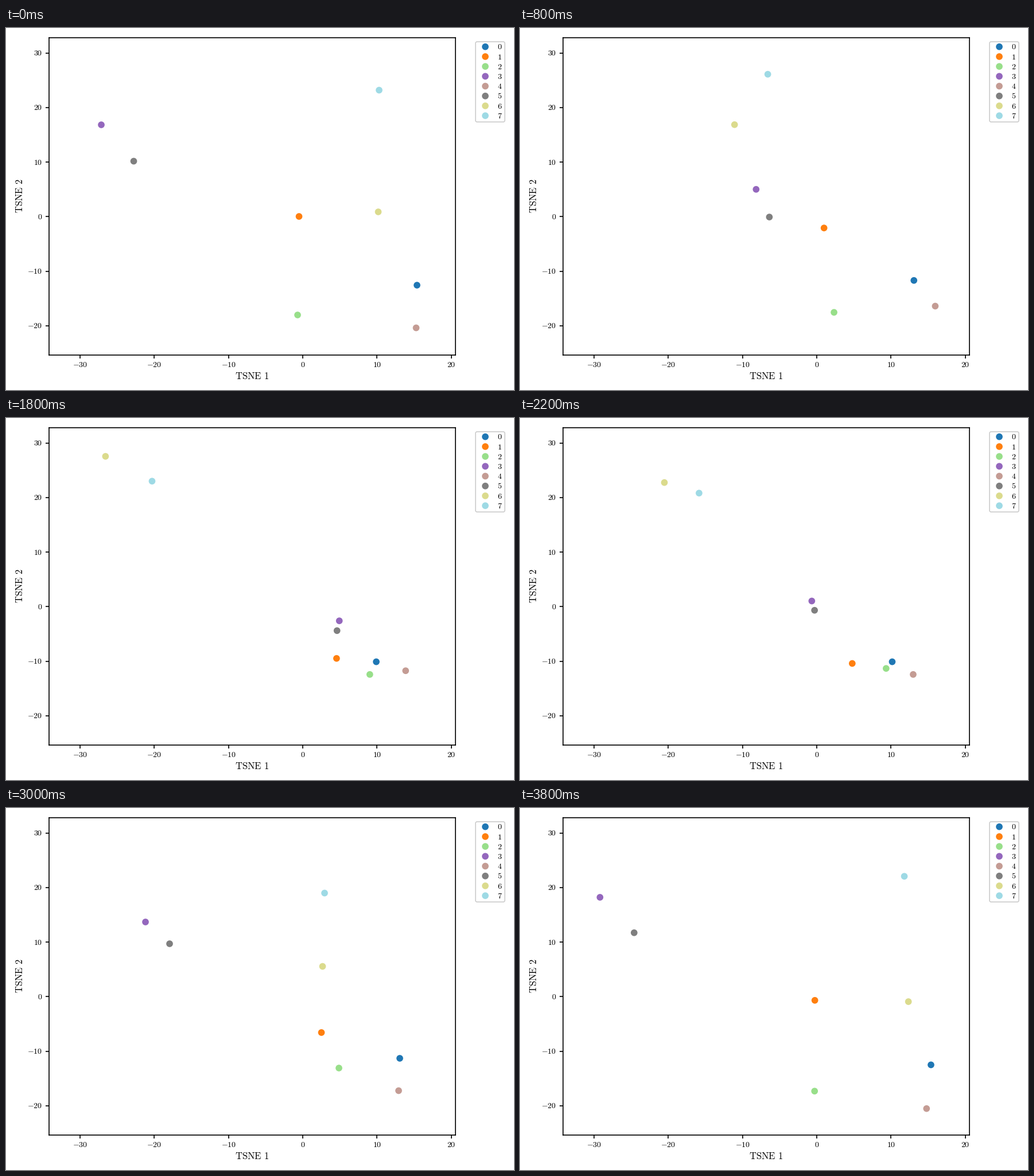
Write a matplotlib script that moves like this. It is 885 px wide and 632 px high and loops after 4 s.

```python
import numpy as np
import matplotlib.pyplot as plt
from matplotlib.animation import FuncAnimation
from matplotlib.patches import FancyBboxPatch

W, H, DPI = 885, 632, 120
LEFT, RIGHT, TOP, BOTTOM = 75, 783, 17, 571
FRAMES, INTERVAL = 20, 200

plt.rcParams.update({"mathtext.fontset": "cm", "axes.linewidth": 1,
                     "xtick.major.width": 1, "ytick.major.width": 1})

# Each dot runs round an ellipse, given by where it is at the start,
# after a quarter turn and after half a turn (stage pixels).
paths = np.array([
    [(716, 449), (675, 437), (645, 425)],
    [(510.5, 329), (540, 363.5), (579, 426.5)],
    [(508, 501), (567, 488), (639, 441)],
    [(166, 169), (477, 311), (554, 341)],
    [(714.5, 523.5), (720.5, 472.5), (690, 442.5)],
    [(222.5, 232.5), (490.5, 352), (553, 356.5)],
    [(648.5, 321), (298.5, 128.5), (201.5, 84)],
    [(650, 108.5), (369, 81), (274, 121)],
])
start, quarter, half = paths.swapaxes(0, 1)
center = (start + half) / 2
COUNT = len(paths)
colors = plt.cm.tab20(np.linspace(0, 1, COUNT))

fig = plt.figure(figsize=(W / DPI, H / DPI), dpi=DPI, facecolor="white")
ax = fig.add_axes([LEFT / W, 1 - BOTTOM / H, (RIGHT - LEFT) / W, (BOTTOM - TOP) / H])


def label(x, y, text, size=8.3, ha="center", **kw):
    ax.text(x, y, f"${text}$", fontsize=size, ha=ha, va="baseline", **kw)


def x_pos(v):
    return 516.9 + 12.93 * v


def y_pos(v):
    return 329.4 - 9.53 * v


def position(turn):
    a = 2 * np.pi * turn
    return center + (start - center) * np.cos(a) + (quarter - center) * np.sin(a)


# Axes
x_ticks = np.arange(-30, 21, 10)
y_ticks = np.arange(-20, 31, 10)
ax.set_xticks(x_pos(x_ticks))
ax.set_yticks(y_pos(y_ticks))
ax.tick_params(labelbottom=False, labelleft=False)
for v in x_ticks:
    label(x_pos(v), 592, v)
for v in y_ticks:
    label(63.3, y_pos(v) + 4.5, v, ha="right")
label(428.8, 612.6, r"\mathrm{TSNE\ 1}", 10)
label(29, 293.5, r"\mathrm{TSNE\ 2}", 10, rotation=90, rotation_mode="anchor")

# Legend
ax.add_patch(FancyBboxPatch((818, 24), 51, 140, boxstyle="round,pad=0,rounding_size=2.7",
                            fc="white", ec="0.8", lw=1, clip_on=False))
rows = 32.7 + 17.2 * np.arange(COUNT)
ax.scatter(np.full(COUNT, 835), rows, s=36, c=colors, clip_on=False, zorder=3)
for i, y in enumerate(rows):
    label(860.3, y + 4.7, i)

dots = ax.scatter(*position(0).T, s=36, c=colors)
ax.set(xlim=(LEFT, RIGHT), ylim=(BOTTOM, TOP))


def update(i):
    dots.set_offsets(position(i / FRAMES))
    return [dots]


anim = FuncAnimation(fig, update, frames=FRAMES, interval=INTERVAL,
                     repeat=True, repeat_delay=0)
plt.show()
```
